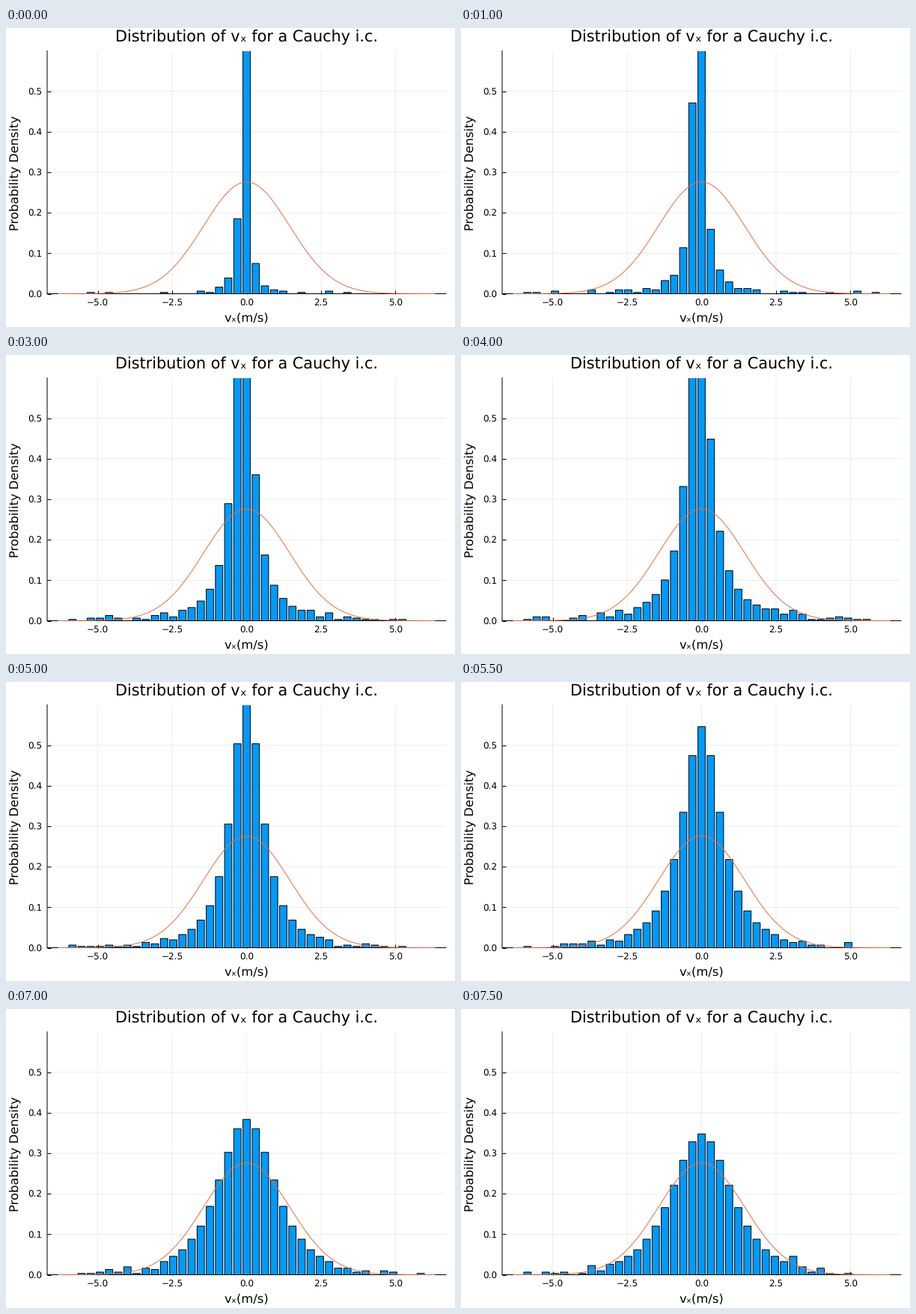
A matplotlib script that plays this animation: 600 by 400 pixels, repeating every 8 s.

```python
import numpy as np
import matplotlib.pyplot as plt
from matplotlib.animation import FuncAnimation

W, H, DPI = 600, 400, 100
FRAMES, INTERVAL = 16, 500
BIN = 12 / 39
UNIT = 1 / (1000 * BIN)  # density of one particle in one bin
SIGMA = 1.445

plt.rcParams.update({"font.family": "DejaVu Sans", "text.hinting": "none",
                     "path.snap": False})

# The sharp, slightly left-leaning peak relaxes to a broad bell
STEPS = [0, 4, 8, 10, 12, 15]
PEAK = [380, 320, 267, 195, 140, 107]
WIDTH2 = [0.1, 0.5, 1.8, 5, 14, 36]
POWER = [1, 1, 1, 1.25, 1.5, 2]
SHIFT = [0.25, 0.45, 0.3, 0, 0, 0]

bins = np.arange(-19, 20)


def counts(step):
    peak, width2, power, shift = (
        np.interp(step, STEPS, p) for p in (PEAK, WIDTH2, POWER, SHIFT))
    mean = peak / (1 + (bins + shift) ** 2 / width2) ** power
    rng = np.random.default_rng(40 + step)
    return np.where(mean < 8, rng.poisson(mean), np.round(mean))


def px(size):
    return size * 72 / DPI


fig = plt.figure(figsize=(W / DPI, H / DPI), dpi=DPI, facecolor="white")
ax = fig.add_axes([55 / W, 44.5 / H, 533 / W, 325 / H])
ax.set(xlim=(-6.696, 6.696), ylim=(0, 0.6))


def label(x, y, text, size, ha="center", **kw):
    fig.text(x / W, 1 - y / H, text, fontsize=px(size), ha=ha,
             va="baseline", **kw)


xticks = [-5, -2.5, 0, 2.5, 5]
yticks = np.arange(6) / 10
ax.set_xticks(xticks)
ax.set_yticks(yticks)
ax.set_axisbelow(True)
ax.grid(color="black", alpha=0.1, linewidth=px(0.7))
ax.tick_params(direction="in", length=px(5), width=px(1),
               labelbottom=False, labelleft=False)
for side in ("top", "right"):
    ax.spines[side].set_visible(False)
for side in ("left", "bottom"):
    ax.spines[side].set_linewidth(px(1))

for v in xticks:
    label(321.5 + 39.8 * v, 372.3, f"{v:.1f}".replace("-", "\u2212"), 12)
for v in yticks:
    label(48, 360.6 - 541.7 * v, f"{v:.1f}", 12, ha="right")
label(321.5, 19, "Distribution of v\u2093 for a Cauchy i.c.", 20.8)
label(321.5, 392.7, "v\u2093(m/s)", 16.4)
label(16.5, 193.5, "Probability Density", 16.4,
      rotation=90, rotation_mode="anchor")

bars = ax.bar(bins * BIN, 0 * bins, width=0.8 * BIN, color="#009AFA",
              edgecolor="black", linewidth=px(1), zorder=1)
v = np.linspace(-6.317, 6.317, 400)
ax.plot(v, np.exp(-v**2 / (2 * SIGMA**2)) / (SIGMA * np.sqrt(2 * np.pi)),
        color="#E36F47", linewidth=px(1), zorder=3)


def draw(step):
    for bar, n in zip(bars, counts(step)):
        bar.set_height(n * UNIT)
    return list(bars)


anim = FuncAnimation(fig, draw, frames=FRAMES, interval=INTERVAL,
                     init_func=lambda: draw(0), repeat=True, repeat_delay=0)
plt.show()
```
